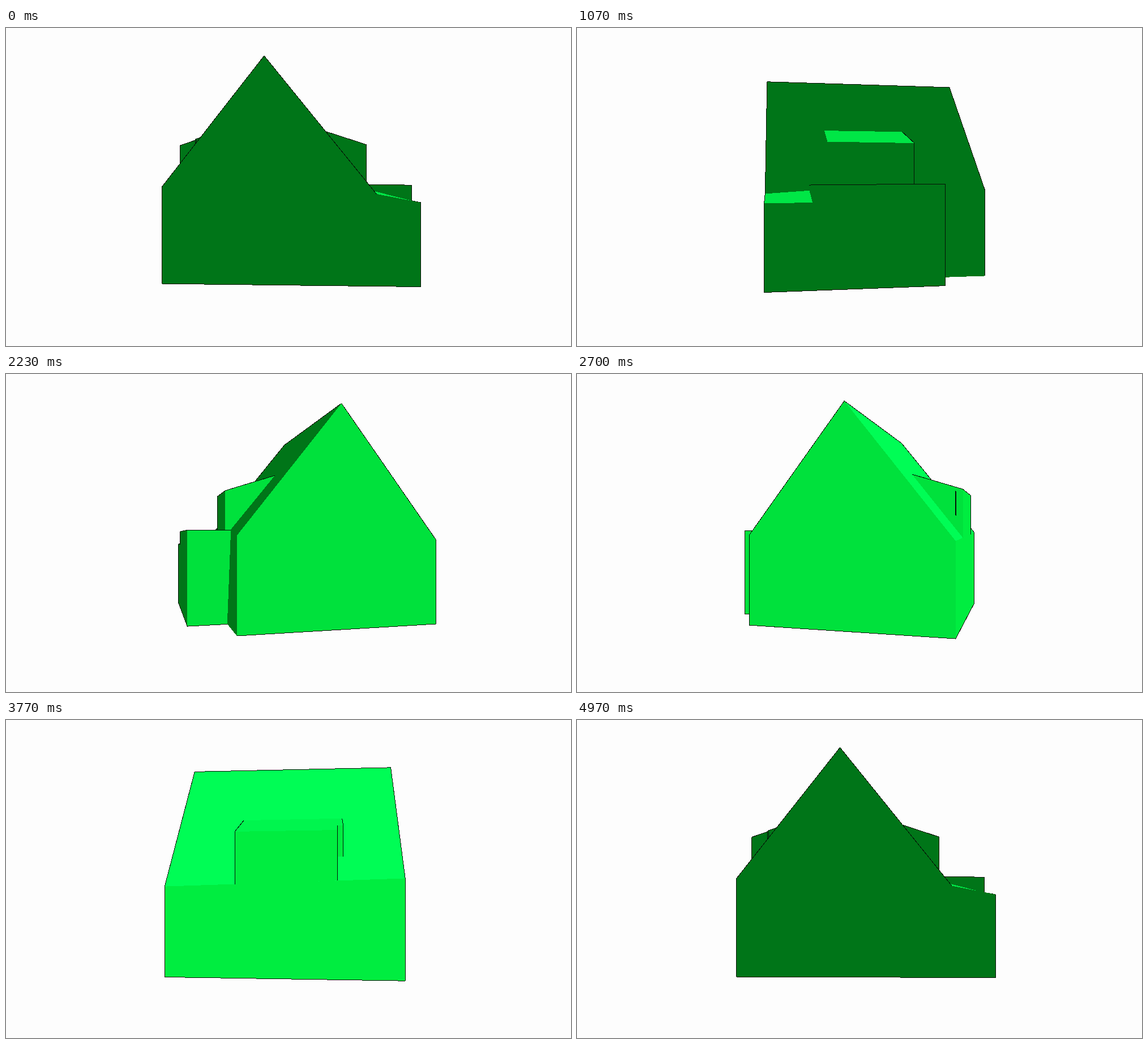
An HTML page that plays this animation: 998x561 px, repeating every 5010 ms.

```html
<!DOCTYPE html>
<html lang="en">
<head>
<meta charset="utf-8">
<title>Rotating house</title>
<style>
html, body { margin: 0; width: 100%; height: 100%; overflow: hidden; background: #fdfdfd; }
svg { display: block; width: 100%; height: 100%; }
</style>
</head>
<body>
<svg id="stage" viewBox="0 0 998 561" shape-rendering="crispEdges"></svg>
<script>
const LOOP = 5010, FRAMES = 150;
const FOCAL = 845, CENTER = { x: 499, y: 280.5 };
const AXIS = { x: 0.048, z: 6.08 };
const START_ANGLE = -3.3;

const DARK = '#007518', GABLE = '#00e13c', WALL = '#00ed40',
      ROOF = '#00fd55', DORMER_ROOF = '#00f54e', LEAN_ROOF = '#00e646';

// Vertices: across the gable, along the ridge, height above the eye.
const points = {
  // main body
  a: [-1.288, -1.204, -1], b: [-1.288, -1.204, 0.006], r: [-0.228, -1.204, 1.34],
  p: [0.91, -1.204, -0.07], q: [0.91, -1.204, -1],
  c: [-1.293, 1.215, -1], d: [-1.293, 1.215, -0.076], s: [-0.175, 1.215, 1.343],
  e: [0.92, 1.22, -0.025], f: [0.92, 1.22, -1],
  // lean-to and flat annex
  g: [1.35, -1.204, -1], k: [1.35, -1.204, -0.156],
  m: [1.35, -0.745, -0.15], n: [0.91, -0.745, -0.038], i: [1.35, -0.745, -1],
  t: [1.35, -0.745, 0.02], u: [1.35, 0.6, 0.031], h: [1.35, 0.6, -1],
  j: [0.92, 0.6, -1], w: [0.87, -0.745, 0.02], x: [0.88, 0.6, 0.03],
  // dormer on the light side, with a small step in its flank
  A: [-1.29, -0.544, 0.486], B: [-1.29, -0.544, -0.016],
  C: [-1.29, 0.491, 0.478], D: [-1.29, 0.491, -0.052],
  E: [-0.728, 0.496, 0.66], F: [-0.748, -0.605, 0.668],
  G: [-1.0945, -0.605, 0.552], H: [-1.0945, -0.544, 0.552],
  I: [-1.0945, -0.605, 0.23], J: [-1.0945, -0.544, 0.23],
  // dormer on the dark side
  M: [0.88, -0.55, 0.484], N: [0.88, -0.55, -0.017],
  O: [0.915, 0.403, 0.481], P: [0.915, 0.403, -0.04],
  Q: [0.34, -0.53, 0.665], R: [0.335, 0.42, 0.67]
};

// Faces run clockwise when seen from outside.
const parts = {
  body: [['agihjfc', DARK], ['abrpkg', DARK], ['cdba', WALL], ['dsrb', ROOF],
         ['fesdc', GABLE], ['qpef', DARK], ['prse', DARK]],
  lean: [['pnmk', LEAN_ROOF], ['gkmi', DARK]],
  annex: [['wxut', LEAN_ROOF], ['nwtm', DARK], ['imtuh', DARK], ['huxj', GABLE]],
  lightDormer: [['BAHJ', DARK], ['JHGI', WALL], ['IGF', DARK], ['ECD', GABLE],
                ['DCAB', WALL], ['CEFGHA', DORMER_ROOF]],
  darkDormer: [['QMN', DARK], ['ORP', GABLE], ['NMOP', DARK], ['MQRO', LEAN_ROOF]]
};

const edgesOf = face => [...face].map((v, k) => [v, face[(k + 1) % face.length]].sort().join(''));

const edgeFaces = {};
for (const faces of Object.values(parts))
  for (const [face] of faces)
    for (const edge of edgesOf(face)) (edgeFaces[edge] ||= []).push(face);

function project([u, v, height], cos, sin) {
  const scale = FOCAL / (AXIS.z + u * sin + v * cos);
  return [CENTER.x + (AXIS.x + u * cos - v * sin) * scale, CENTER.y - height * scale];
}

// Back-to-front order follows from the side of each dividing plane the eye is on.
function drawOrder(cos, sin) {
  const eyeU = -AXIS.x * cos - AXIS.z * sin;
  const eyeV = AXIS.x * sin - AXIS.z * cos;
  const annexes = eyeV < -0.745 ? ['annex', 'lean'] : ['lean', 'annex'];
  const order = ['lightDormer', 'body', 'darkDormer', ...annexes];
  if (eyeU > 0.89) return order;
  if (eyeU < -1.25) return [...annexes, 'darkDormer', 'body', 'lightDormer'];
  return [...annexes, 'darkDormer', 'lightDormer', 'body'];
}

const stage = document.getElementById('stage');

function render(time) {
  const frame = Math.min(FRAMES - 1, Math.floor((time + 5) * 3 / 100));
  const angle = (START_ANGLE - frame * 360 / FRAMES) * Math.PI / 180;
  const cos = Math.cos(angle), sin = Math.sin(angle);

  const screen = {};
  for (const key in points) screen[key] = project(points[key], cos, sin);
  const path = keys => 'M' + [...keys].map(k => screen[k].map(n => n.toFixed(2))).join('L');

  const isFront = face => [...face].reduce((area, key, k) => {
    const [x1, y1] = screen[key], [x2, y2] = screen[face[(k + 1) % face.length]];
    return area + x1 * y2 - x2 * y1;
  }, 0) > 0;

  let markup = '';
  for (const name of drawOrder(cos, sin)) {
    let outline = '';
    for (const [face, color] of parts[name]) {
      if (!isFront(face)) continue;
      markup += `<path d="${path(face)}Z" fill="${color}"/>`;
      for (const edge of edgesOf(face))
        if (edgeFaces[edge].some(other => !isFront(other))) outline += path(edge);
    }
    markup += `<path d="${outline}" fill="none" stroke="#061006"/>`;
  }
  stage.innerHTML = markup;
}

const start = performance.now();
function tick() {
  render((performance.now() - start) % LOOP);
  requestAnimationFrame(tick);
}
tick();
</script>
</body>
</html>
```
